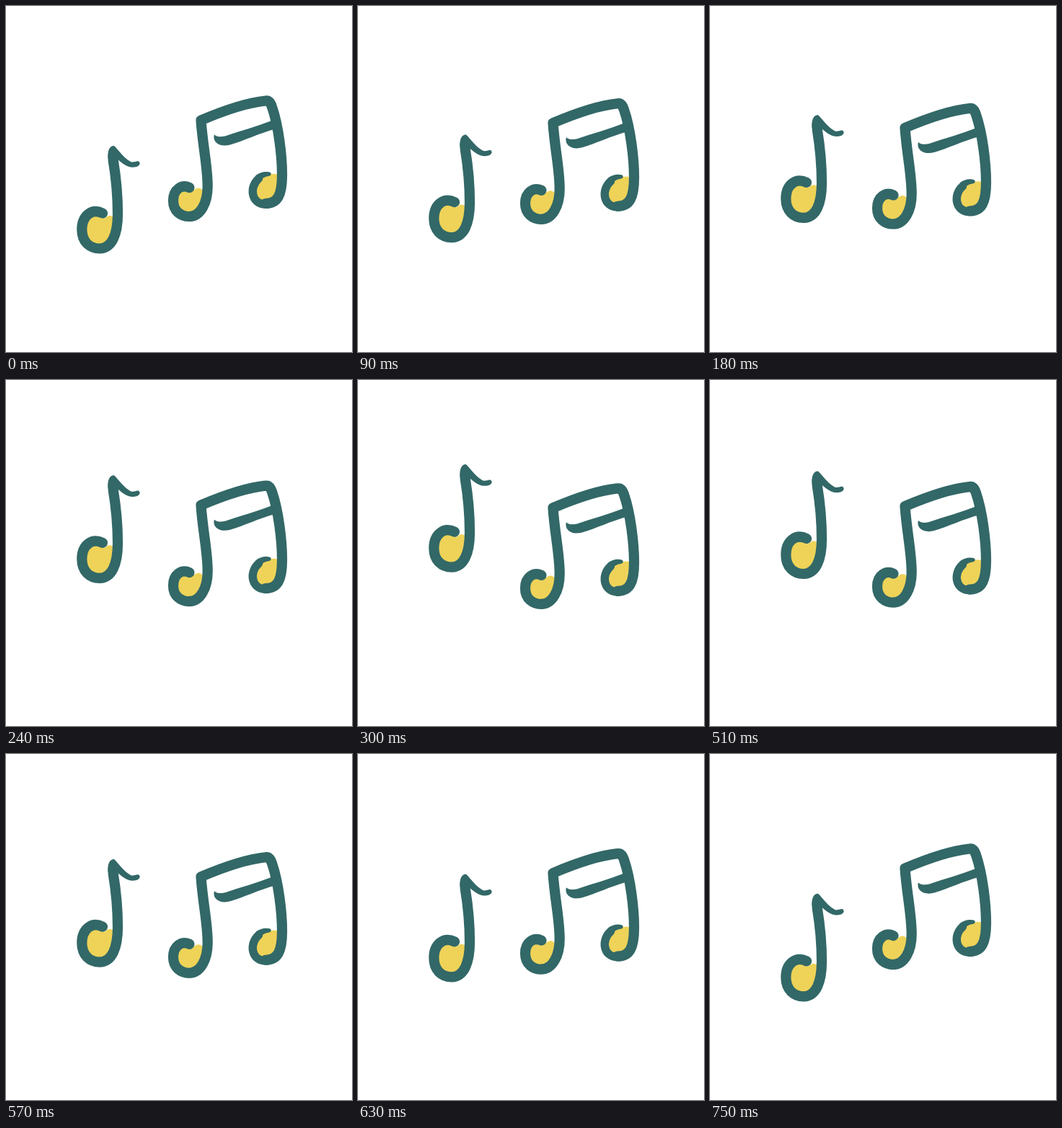
Write an HTML page that moves like this. It is 480x480 px and loops after 0.78 s.

```html
<!DOCTYPE html>
<html lang="en">
<head>
<meta charset="utf-8">
<title>Music notes</title>
<style>
  html, body { margin: 0; width: 100%; height: 100%; overflow: hidden; background: #fff; }
  svg { display: block; width: 100vw; height: 100vh; }
  .line { fill: none; stroke: #326867; stroke-width: 14.2; stroke-linecap: round; stroke-linejoin: round; }
  .thin { stroke-width: 11.4; }
  .ink { fill: #326867; }
  .head { fill: #eed358; }
</style>
</head>
<body>
<svg viewBox="0 0 480 480">
  <g id="single">
    <path class="head" d="M136 295L142 291Q146 290 150 294L155 300C152 325 143 337 130 337C110 337 104 313 108 300C114 285 128 286 136 295Z"/>
    <path class="line" d="M134 287.5C119 280 105.300 291 105.300 310C105.300 327 116 336.500 130 336.500C147 336 155 317 155 288C155 258 153 240 148.700 214L148.700 207"/>
    <path class="ink" d="M141.500 212C140.500 200 144 193.500 150 194C154 197 164 212 174 216.500C179 217 181 214.500 184 215.500C187.500 218 185 222 181 223C170 226 162 219 154 212Z"/>
  </g>
  <g id="pair">
    <path class="head" d="M259 257Q266 250 271 254L280 260C277 280 268 292 254 292C238 292 231 272 235 262C240 250 254 248 259 257Z"/>
    <path class="head" d="M364 235Q371 231 377 234L383 245C382 268 375 274 360 274C342 274 338 252 346 242C350 236 358 234 364 235Z"/>
    <path class="line" d="M254.500 252C244 247 232 254 232 270C232 285 243 292 254 292C270 292 279.700 273 279.700 250C279.700 222 273 195 270.500 158.500C300 146 335 134 360 131.500Q366 130.500 369 140C378 166 383 208 383 234C383 262 377 274 360 274"/>
    <path class="line thin" d="M360 275C340 275 337 251 350.500 239.500"/>
    <path class="ink" d="M346 236C351 230 361 229 366 230.500C369 232 368 235.500 364 236C358 237 354 240 351 244Z"/>
    <path class="ink" d="M289 178.500C292 181.500 299 182 304 180.500C326 173 348 167 370 158.500L374 170.500C350 177 330 187 311 192.500C299 196 287 191 288.500 180Z"/>
  </g>
</svg>
<script>
  const STEP = 30, STEPS = 26, PEAK = 13;
  const single = document.getElementById('single');
  const pair = document.getElementById('pair');
  const ease = p => (1 - Math.cos(Math.PI * p)) / 2;
  const shift = (el, y) => el.setAttribute('transform', `translate(0 ${y.toFixed(2)})`);

  function draw(now) {
    const step = Math.floor(now / STEP) % STEPS;
    // The rise is already one step under way when the loop begins.
    const progress = step < PEAK
      ? ease((step + 1) / (PEAK + 1))
      : ease((STEPS - step) / (STEPS - PEAK));
    const lift = progress - ease(1 / (PEAK + 1));
    shift(single, -87.5 * lift);
    shift(pair, 21.5 * lift);
  }

  const start = performance.now();
  function tick() {
    draw(performance.now() - start);
    requestAnimationFrame(tick);
  }
  tick();
</script>
</body>
</html>
```
